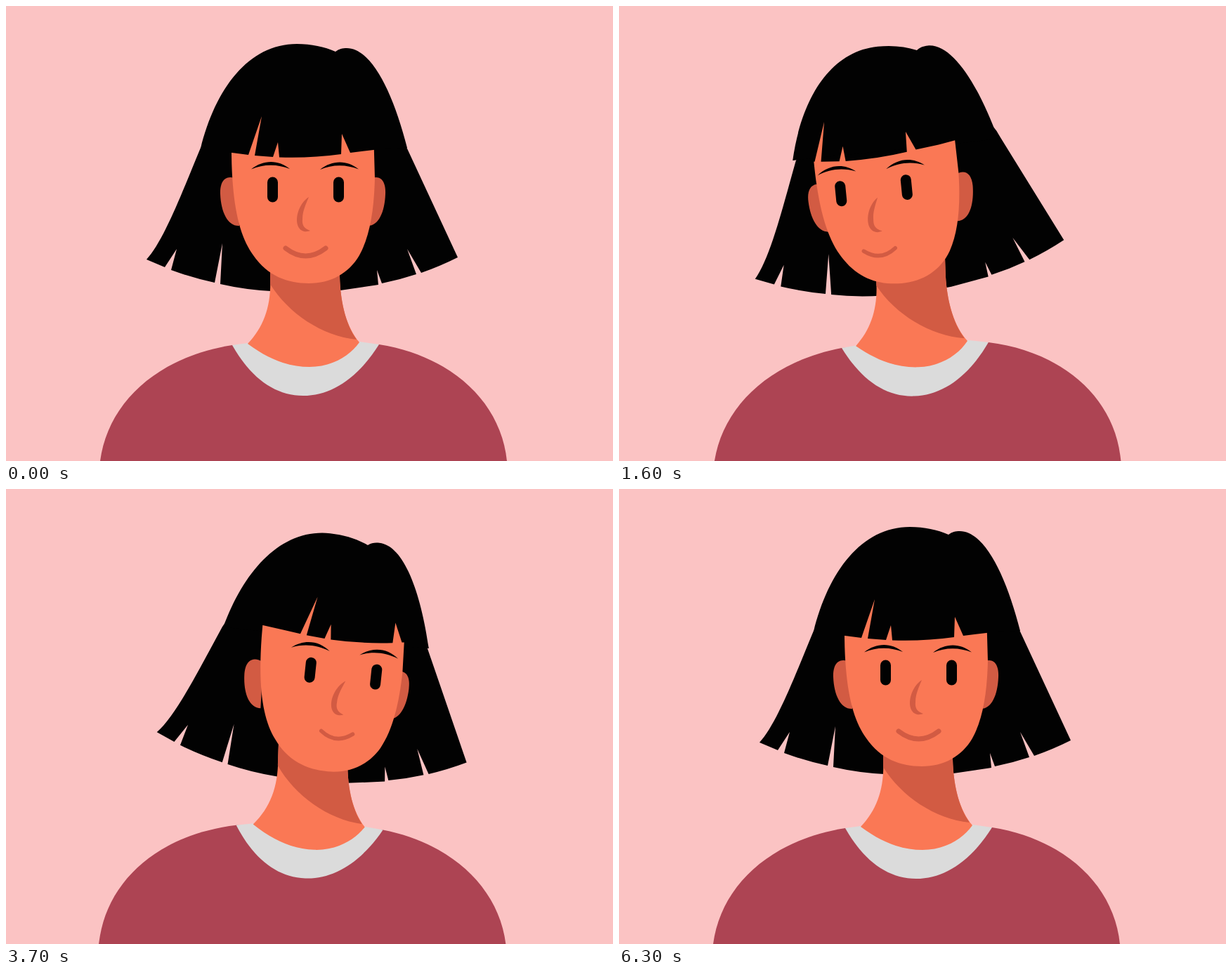
These frames come from a looping animation (864x648 px, 7.2 s). An HTML page:

```html
<!DOCTYPE html>
<html lang="en">
<head>
<meta charset="utf-8">
<title>Portrait looking around</title>
<style>
  html, body { margin: 0; width: 100%; height: 100%; overflow: hidden; background: #fbc3c3; }
  svg { display: block; width: 100vw; height: 100vh; }
  .hair { fill: #020202; }
  .skin { fill: #fa7855; }
  .shade { fill: #d25b43; }
</style>
</head>
<body>
<svg viewBox="0 0 864 648">
  <defs>
    <!-- Visible skin below the fringe -->
    <clipPath id="window">
      <path id="fringe" d="M230 198 L322 209 L345 212 L364 157 L354 213 L380 215 L387 194 L389 215.500
        Q434 217 477 211 L478 182 L490 209 L523 205 L590 194 V520 H230Z"/>
    </clipPath>
  </defs>

  <path id="back" class="hair" d="M277 202 C252 262 225 334 200 361 L226 372 L243 346 L235 376
    Q265 387 297 394 L308 338 L305 396 Q340 404 377 406 Q430 409 476 405 L530 397 L528 376 L535 395
    Q560 390 584 382 L571 346 L591 380 Q617 371 643 358 L571 203 L566 192 L540 150 H305Z"/>
  <path id="cap" class="hair" d="M277 203 C298 118 345 54 414 54 C435 54 453 58 469 65
    C474 61 479 60 485 60 C520 60 551 123 571 202 L540 203Z"/>

  <g id="body">
    <path fill="#ad4453" d="M128 700 L134 648 C145 565 215 500 322 483 L531 482 C632 498 704 562 713 648 L718 700Z"/>
    <path fill="#dbdbdb" d="M322 483 L344 480 L503 478 L531 482 C501 530 463 555 423 555 C382 555 348 529 322 483Z"/>
  </g>
  <g id="neck">
    <path class="skin" d="M376 350 V385 C378 425 368 456 344 481 C375 504 403 514 432 514
      C463 514 489 499 503 479 C485 458 476 425 475 385 V350Z"/>
    <path class="shade" d="M376 350 V396 C402 438 450 470 499 475 C483 452 476 420 475 385 V350Z"/>
  </g>

  <g id="ears" class="shade">
    <path d="M330 247 C314 239 304 248 305 268 C306 294 316 314 332 313Z"/>
    <path d="M516 247 C532 239 541 248 540 268 C539 294 530 314 514 313Z"/>
  </g>

  <g clip-path="url(#window)">
    <path id="face" class="skin" d="M321 140 V212 C322 290 334 330 352 355 C372 384 400 395 431 395
      C462 395 488 381 503 355 C518 328 524 290 525 245 L522 140Z"/>
  </g>

  <g id="features">
    <g id="brows" class="hair">
      <path id="brow" d="M349 232.500 C366 218.500 388 218.500 404 232 C387 225 367 224.500 349 232.500Z"/>
      <use href="#brow" x="98" y="0.500"/>
    </g>
    <g id="eyes" class="hair">
      <rect x="372" y="243.500" width="15" height="36" rx="7.500"/>
      <rect x="466" y="243.500" width="15" height="36" rx="7.500"/>
    </g>
    <path class="shade" d="M431 272 C416 282 410 305 417 316 C421 322 428 322 433 320
      C425 317 421 313 422 303 C422 292 427 282 431 272Z"/>
    <path id="mouth" fill="none" stroke="#d25b43" stroke-width="7" stroke-linecap="round" d="M398 345 Q426.500 367 455 345"/>
  </g>
</svg>

<script>
const LOOP = 7200, STEP = 100;

// Each track: [start, duration, pose]; -1 looks left, 0 ahead, 1 right.
const bodyTrack = [[0, 1200, -1], [1850, 1200, 1], [4020, 1150, -.8], [5170, 1130, 0]];
const headTrack = [[30, 1200, -1], [1880, 1500, 1], [4090, 1250, -.8], [5340, 960, 0]];
const hairTrack = [[90, 1500, -1], [1990, 1540, 1], [4170, 1220, -.8], [5390, 910, 0]];
const blinkStarts = [2050, 4220];

const part = Object.fromEntries(
  [...document.querySelectorAll('[id]')].map(el => [el.id, el]));

const clamp = u => Math.min(1, Math.max(0, u));
const inOut = u => u < .5 ? 4 * u ** 3 : 1 - 4 * (1 - u) ** 3;

function poseAt(track, t) {
  let pose = 0;
  for (const [start, duration, target] of track) {
    pose += (target - pose) * inOut(clamp((t - start) / duration));
  }
  return pose;
}

// Eye height: quick smooth close, slower opening
function eyeOpen(t) {
  const closing = 360, opening = 650, shut = .1;
  for (const start of blinkStarts) {
    const age = t - start;
    if (age < 0 || age > closing + opening) continue;
    if (age < closing) {
      const u = age / closing;
      return 1 - (1 - shut) * u * u * (3 - 2 * u);
    }
    const rest = 1 - (age - closing) / opening;
    return 1 - (1 - shut) * rest * rest;
  }
  return 1;
}

const mix = (pose, left, right) => pose < 0 ? -pose * left : pose * right;

function place(el, [px, py], dx, dy, angle) {
  el.setAttribute('transform', `translate(${dx} ${dy}) rotate(${angle} ${px} ${py})`);
}

function scaleAbout(el, x, y, sx, sy) {
  el.setAttribute('transform', `translate(${x} ${y}) scale(${sx} ${sy}) translate(${-x} ${-y})`);
}

function draw(t) {
  const body = poseAt(bodyTrack, t);
  const head = poseAt(headTrack, t);
  const hair = poseAt(hairTrack, t);
  const open = eyeOpen(t);

  const lean = mix(body, -1.9, 2.1);
  place(part.body, [440, 635], 0, 0, lean);
  place(part.neck, [440, 690], 0, 0, lean);

  const crown = [469, 65];
  const hairX = mix(.75 * head + .25 * hair, -45, 46);
  const hairY = mix(hair, -2, 15);
  place(part.cap, crown, hairX, hairY, mix(hair, -5.9, 6.1));
  place(part.back, crown, hairX - 1.8 * hair, hairY, mix(hair, -6.8, 6));

  const skull = [422.5, 278];
  const headY = mix(head, 1, 7);
  const headTilt = 4.8 * head;
  place(part.ears, skull, mix(head, -35, 33), headY, headTilt);
  place(part.face, skull, mix(head, -38.5, 37), headY, headTilt);

  const tilt = mix(head, -5.6, 6);
  place(part.fringe, [421, 169.5], mix(head, -71, 78), 2.5 * Math.abs(head), tilt);
  place(part.features, [426.5, 261], mix(head, -64, 53.5), 1.2 * Math.abs(head), tilt);

  const narrow = 1 - .21 * Math.abs(head);
  scaleAbout(part.mouth, 426.5, 350, narrow, narrow);
  scaleAbout(part.eyes, 426.5, 261.5, 1, open);
  part.brows.setAttribute('transform', `translate(0 ${20 * (1 - open)})`);
}

const begin = performance.now();
function tick() {
  const t = (performance.now() - begin) % LOOP;
  draw(Math.floor(t / STEP) * STEP);
  requestAnimationFrame(tick);
}
tick();
</script>
</body>
</html>
```
